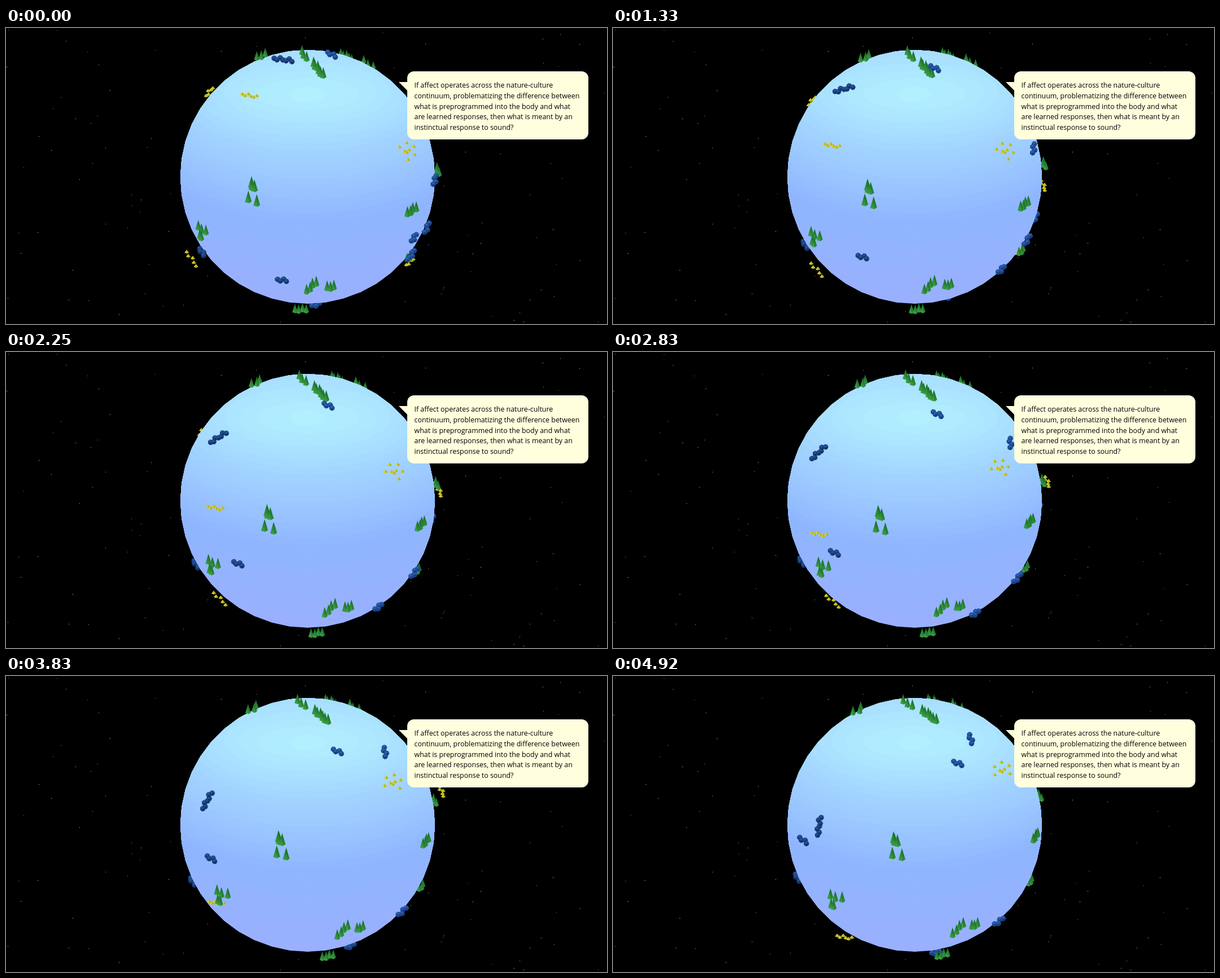
These frames come from a looping animation (1065 by 526 pixels, 5.01 s). An HTML page with a canvas:

```html
<!DOCTYPE html>
<html lang="en">
<head>
<meta charset="utf-8">
<title>Planet</title>
<style>
html, body { margin: 0; width: 100%; height: 100%; overflow: hidden; background: #000; }
canvas { position: absolute; left: 0; top: 0; display: block; }
.bubble {
  position: absolute; left: 711px; top: 77px; width: 321px; height: 121px;
  box-sizing: border-box; padding: 16px 0 0 12.5px; border-radius: 12px;
  background: #ffffde; color: #000; white-space: pre;
  font: 12.4px/18.75px "Open Sans", sans-serif;
}
.bubble::before {
  content: ""; position: absolute; left: -15px; top: 19px; width: 16px; height: 16px;
  background: #ffffde; clip-path: polygon(0 0, 100% 0, 100% 100%);
}
</style>
</head>
<body>
<canvas id="stage" width="1065" height="526"></canvas>
<div class="bubble">If affect operates across the nature-culture
continuum, problematizing the difference between
what is preprogrammed into the body and what
are learned responses, then what is meant by an
instinctual response to sound?</div>
<script>
const W = 1065, H = 526, LOOP = 5010, LAST = 59;
const CX = 534.5, CY = 264.5, RIM = 225.5;
const EYE = 3, FOCAL = RIM * Math.sqrt(EYE * EYE - 1);   // camera for a globe of radius 1
const TILT = 43.5 * Math.PI / 180, TURN = .265;          // axis and total turn of the trees
const MID = .458;                                        // moment of a path's middle point
const ctx = document.getElementById('stage').getContext('2d');
const lerp = (a, b, u) => a + (b - a) * u;
const rad = deg => deg * Math.PI / 180;

function polygon(c, points) {
  c.beginPath();
  points.forEach(([x, y]) => c.lineTo(x, y));
  c.closePath();
}

const regular = (x, y, r, n) => Array.from({ length: n }, (_, i) =>
  [x + r * Math.cos(i / n * 2 * Math.PI), y + r * Math.sin(i / n * 2 * Math.PI)]);

// Screen point to globe; points beyond the rim float just above it
function lift(x, y, far) {
  const qx = (x - CX) / FOCAL, qy = (CY - y) / FOCAL, q = 1 + qx * qx + qy * qy;
  const r2 = Math.max(1, EYE * EYE * (q - 1) / q);
  const root = Math.sqrt(Math.max(0, EYE * EYE - q * (EYE * EYE - r2)));
  const depth = (EYE + (far ? root : -root)) / q;
  return [qx * depth, qy * depth, EYE - depth];
}

const project = ([x, y, z]) => [CX + FOCAL * x / (EYE - z), CY - FOCAL * y / (EYE - z)];

// Turn about the axis that leans towards the camera
function spin([x, y, z], angle) {
  const ct = Math.cos(TILT), st = Math.sin(TILT), c = Math.cos(angle), s = Math.sin(angle);
  const along = ct * y + st * z, across = ct * z - st * y;
  const side = across * c - x * s;
  return [x * c + across * s, ct * along - st * side, st * along + ct * side];
}

// Sky and globe, painted once
function layer(paint) {
  const canvas = document.createElement('canvas');
  canvas.width = W;
  canvas.height = H;
  paint(canvas.getContext('2d'));
  return canvas;
}

let seed = 7;
const random = () => (seed = seed * 16807 % 2147483647) / 2147483647;

const sky = layer(c => {
  c.fillStyle = '#000';
  c.fillRect(0, 0, W, H);
  for (let i = 0; i < 130; i++) {
    c.fillStyle = `hsl(0 0% ${45 + 45 * random()}%)`;
    c.fillRect(Math.floor(random() * W), Math.floor(random() * H), 1, 1);
  }
});

const shades = [
  [0, 178, 239, 255], [.3, 161, 209, 255], [.62, 143, 181, 255], [1, 154, 176, 255]
];

function shade(s) {
  const i = Math.max(1, shades.findIndex(row => row[0] >= s));
  const a = shades[i - 1], b = shades[i], u = (s - a[0]) / (b[0] - a[0]);
  return `rgb(${[1, 2, 3].map(n => Math.round(lerp(a[n], b[n], u)))})`;
}

const globe = layer(c => {
  polygon(c, regular(CX, CY, RIM, 44));
  c.clip();
  for (let i = 29; i >= 0; i--) {
    const s = i / 29;
    c.fillStyle = shade(s);
    c.beginPath();
    c.ellipse(CX, 118 - 22 * s, 30 + 460 * s ** .6, 14 + 380 * s, 0, 0, 2 * Math.PI);
    c.fill();
  }
});

// Shapes
function facet(color, ...points) {
  ctx.fillStyle = color;
  polygon(ctx, points);
  ctx.fill();
}

function drawTree(x, y, z) {
  const h = 46 / (EYE - z), w = h * .27;
  const fill = ctx.createLinearGradient(0, y - h, 0, y);
  fill.addColorStop(0, 'hsl(129 62% 26%)');
  fill.addColorStop(1, 'hsl(126 45% 44%)');
  facet(fill, [x, y - h], [x + w, y - 3], [x + 1, y], [x - w, y - 2]);
  facet('rgba(0,50,10,.18)', [x, y - h], [x + w, y - 3], [x + 1, y]);
}

function drawRock(x, y) {
  const bright = x > CX ? 5 : 0;
  facet(`hsl(217 66% ${30 + bright}%)`, ...regular(x, y, 5.1, 7));
  facet(`hsl(216 58% ${37 + bright}%)`,
    [x - 3, y - 3.5], [x + 2, y - 3.5], [x + 1, y], [x - 2, y + 1]);
  facet(`hsl(218 70% ${24 + bright}%)`,
    [x + 1, y], [x + 4, y + 2], [x, y + 4.5], [x - 2, y + 1]);
}

function drawTuft(x, y) {
  facet('#d6cf2c', [x, y - 3.5], [x + 4, y + 1.5], [x, y + 3], [x - 4, y + 1.5]);
  facet('#b3b01e', [x, y - 3.5], [x + 4, y + 1.5], [x, y + 3]);
}

// Layouts: offsets around a clump's centre
function chain(n, half, deg, wave = 2.5) {
  const c = Math.cos(rad(deg)), s = Math.sin(rad(deg));
  return Array.from({ length: n }, (_, i) => {
    const a = n > 1 ? half * (2 * i / (n - 1) - 1) : 0, b = wave * Math.sin(i * 2.2);
    return [a * c - b * s, a * s + b * c];
  });
}

function ring(n, r, deg) {
  const out = Array.from({ length: n }, (_, i) =>
    [r * Math.cos(rad(deg + 58 * i)), r * Math.sin(rad(deg + 58 * i))]);
  return [...out, ...chain(3, 4, 0)];
}

// Trees turn with the globe and pass behind its rim
function grove(x, y, n, half, deg, far = false) {
  const feet = chain(n, half, deg, 1.5)
    .sort((a, b) => a[1] - b[1])
    .map(([dx, dy]) => lift(x + dx, y + dy, far));
  return (u, front) => feet.forEach(foot => {
    const p = spin(foot, TURN * u);
    const facing = p[2] * EYE > Math.hypot(...p) ** 2 - .15;
    if (facing === front) drawTree(...project(p), p[2]);
  });
}

// A wanderer curves over the globe through three points while its layout turns;
// it is in front of the globe until the moment `until`
function wander(draw, until, path, layout, n, half, deg0, deg1 = deg0) {
  const keys = path.map(([x, y]) => lift(x, y));
  const sizes = keys.map(p => Math.hypot(...p));
  return (u, front) => {
    if ((u < until) !== front) return;
    const weights = [
      (u - MID) * (u - 1) / MID,
      u * (1 - u) / (MID * (1 - MID)),
      u * (u - MID) / (1 - MID)
    ];
    const mix = values => values.reduce((sum, v, i) => sum + v * weights[i], 0);
    const p = [0, 1, 2].map(axis => mix(keys.map(key => key[axis])));
    const scale = mix(sizes) / Math.hypot(...p);
    const [x, y] = project(p.map(v => v * scale));
    layout(n, half, lerp(deg0, deg1, u)).forEach(([dx, dy]) => draw(x + dx, y + dy));
  };
}

const ALWAYS = 2, NEVER = -1;
const tuft = (...args) => wander(drawTuft, ...args);
const rock = (...args) => wander(drawRock, ...args);

const tufts = [
  tuft(ALWAYS, [[431, 120], [370, 277], [410, 464]], chain, 6, 13, 12),
  tuft(NEVER, [[360, 113], [348, 140], [370, 190]], chain, 5, 9, -53),
  tuft(NEVER, [[329, 410], [379, 438], [440, 430]], chain, 5, 15, 54, 30),
  tuft(ALWAYS, [[710, 219], [687, 213], [689, 168]], ring, 5, 15, 210, 150),
  tuft(NEVER, [[715, 415], [715, 380], [700, 330]], chain, 5, 8, -45),
  tuft(NEVER, [[735, 340], [768, 247], [776, 180]], chain, 5, 9, 65)
];

const rocks = [
  rock(ALWAYS, [[491, 56], [376, 152], [365, 267]], chain, 7, 16, 8, -81),
  rock(ALWAYS, [[489, 448], [411, 376], [337, 292]], chain, 4, 8, 10, 40),
  rock(ALWAYS, [[577, 47], [571, 95], [611, 155]], chain, 4, 8, 31, 25),
  rock(ALWAYS, [[760, 270], [722, 180], [634, 112]], chain, 4, 8, 107, 75),
  rock(.6, [[723, 373], [660, 453], [572, 491]], chain, 4, 7, 125, 165),
  rock(ALWAYS, [[746, 355], [724, 392], [684, 436]], chain, 4, 9, 115, 145),
  rock(.2, [[718, 404], [752, 300], [745, 240]], chain, 5, 10, 123),
  rock(.17, [[347, 398], [337, 377], [327, 358]], chain, 4, 7, 58),
  rock(NEVER, [[549, 492], [620, 462], [670, 410]], chain, 3, 7, -8)
];

const trees = [
  grove(603, 56, 5, 11, 25, true),
  grove(642, 70, 3, 10, 36, true),
  grove(708, 132, 1, 0, 0, true),
  grove(452, 56, 3, 8, -17),
  grove(528, 55, 3, 7, 60),
  grove(553, 81, 6, 13, 52),
  grove(765, 260, 3, 5, 75),
  grove(437, 289, 3, 4, 60),
  grove(437, 314, 2, 8, 18),
  grove(719, 332, 4, 9, -31),
  grove(347, 365, 3, 8, 38),
  grove(345, 377, 2, 2, 30),
  grove(715, 414, 3, 5, -30),
  grove(541, 467, 4, 11, -40),
  grove(575, 468, 3, 6, 0),
  grove(522, 507, 4, 10, 0)
];

function render(u) {
  const paint = (list, front) => list.forEach(item => item(u, front));
  ctx.drawImage(sky, 0, 0);
  [tufts, rocks, trees].forEach(list => paint(list, false));
  ctx.drawImage(globe, 0, 0);
  [tufts, trees, rocks].forEach(list => paint(list, true));
}

// Twelve steps a second
const start = performance.now();
let shown = -1;

function tick() {
  const t = (performance.now() - start) % LOOP;
  const step = Math.min(LAST, Math.floor((t + 5) * .012));
  if (step !== shown) render((shown = step) / LAST);
  requestAnimationFrame(tick);
}
tick();
</script>
</body>
</html>
```
